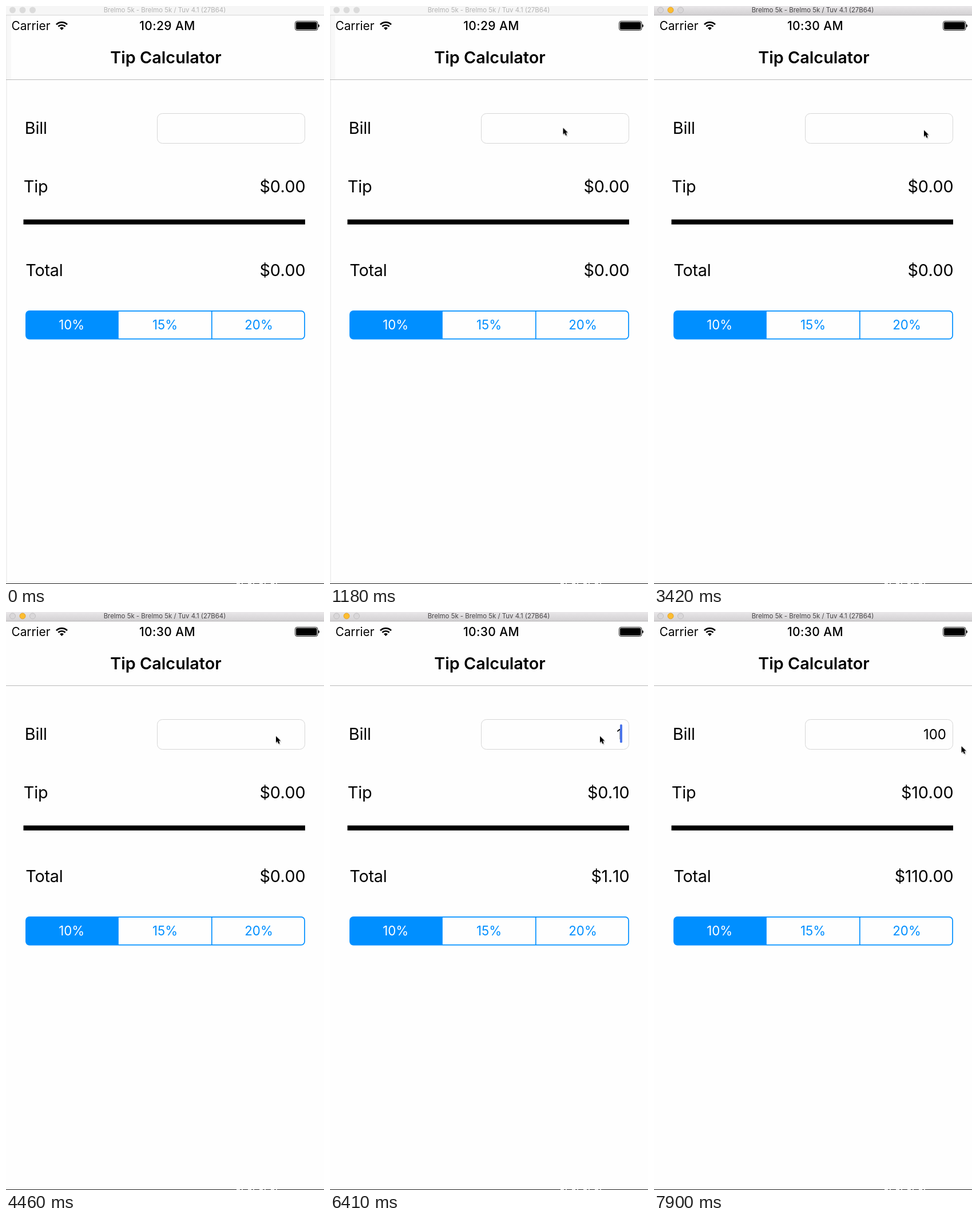
Write an HTML page that moves like this. It is 556x1008 px and loops after 8000 ms.

```html
<!DOCTYPE html>
<html lang="en">
<head>
<meta charset="utf-8">
<title>Tip Calculator</title>
<style>
html, body { margin: 0; width: 100%; height: 100%; overflow: hidden; background: #fefefe; }
svg { display: block; width: 556px; height: 1008px; font-family: Inter, Roboto, sans-serif; }
.label { font-size: 28.8px; letter-spacing: -.2px; }
.sum { font-size: 28.8px; letter-spacing: -.3px; text-anchor: end; font-kerning: none; }
.entry { font-size: 24px; text-anchor: end; font-kerning: none; }
.mid { text-anchor: middle; }
.heading { font-size: 28.8px; font-weight: 600; }
.bar { font-size: 11.4px; }
.status { font-size: 20.8px; }
.clock { font-size: 21px; font-weight: 500; letter-spacing: .4px; }
.tab { font-size: 22.3px; }

/* One loop is 8 s, so 1% is 80 ms; every change is a hard step. */
.step { animation: 8s step-end infinite; }
.idle { animation-name: idle; }
.active { animation-name: active; }
.bill0 { animation-name: bill0; }
.bill1 { animation-name: bill1; }
.bill10 { animation-name: bill10; }
.bill100 { animation-name: bill100; }
.caret { animation-name: caret; }
.pointer { animation-name: pointer; }

@keyframes idle { 0% { visibility: visible } 42.75%, 100% { visibility: hidden } }
@keyframes active { 0% { visibility: hidden } 42.75%, 100% { visibility: visible } }
@keyframes bill0 { 0% { visibility: visible } 80.125%, 100% { visibility: hidden } }
@keyframes bill1 { 0% { visibility: hidden } 80.125% { visibility: visible } 85.75%, 100% { visibility: hidden } }
@keyframes bill10 { 0% { visibility: hidden } 85.75% { visibility: visible } 87.625%, 100% { visibility: hidden } }
@keyframes bill100 { 0% { visibility: hidden } 87.625%, 100% { visibility: visible } }
@keyframes caret {
  0%, 55.75%, 68.875%, 96.875%, 100% { opacity: 0 }
  48.25%, 61.375%, 74.5%, 80.125% { opacity: 1 }
  53.875%, 59.5%, 67%, 72.625%, 78.25%, 95% { opacity: .18 }
}
@keyframes pointer {
  0% { transform: translate(266px, 880px); opacity: 0 }
  3.75% { transform: translate(267px, 880px); opacity: 1 }
  5.625% { transform: translate(300px, 640px) }
  7.5% { transform: translate(335px, 450px) }
  9.25% { transform: translate(365px, 330px) }
  11.125% { transform: translate(388px, 260px) }
  12.875% { transform: translate(400px, 230px) }
  14.75% { transform: translate(407.5px, 212.5px); opacity: 1 }
  16.625% { transform: translate(433px, 230px) }
  18.5% { transform: translate(440px, 500px) }
  20.25% { transform: translate(443px, 719px); opacity: 1 }
  22.125% { transform: translate(443px, 719px); opacity: 0 }
  42.75% { transform: translate(472px, 216.5px); opacity: 1 }
  95% { transform: translate(472px, 216.5px); opacity: 1 }
  96.875% { transform: translate(510px, 228px); opacity: 1 }
  98.75%, 100% { transform: translate(537.5px, 234px); opacity: 1 }
}
</style>
</head>
<body>
<svg viewBox="0 0 556 1008">
  <defs>
    <linearGradient id="chrome" x2="0" y2="1">
      <stop stop-color="#e9e7e9"/>
      <stop offset="1" stop-color="#d2d0d2"/>
    </linearGradient>
  </defs>
  <rect width="556" height="1008" fill="#fefefe"/>

  <!-- window chrome -->
  <g class="step idle">
    <rect y="16" width="9" height="112" fill="#f8f8f8"/>
    <rect y="16" width="2" height="991" fill="#f1f1f1"/>
    <rect width="556" height="16" fill="#f6f6f6"/>
    <rect y="15.5" width="556" height="1" fill="#d6d6d6"/>
    <g fill="#dbdbdb">
      <circle cx="11.5" cy="7" r="5.5"/><circle cx="29" cy="7" r="5.5"/><circle cx="46.5" cy="7" r="5.5"/>
    </g>
    <text class="bar mid" x="277.5" y="11" fill="#b4b4b4">Brelmo 5k - Brelmo 5k / Tuv 4.1 (27B64)</text>
    <text class="clock mid" x="282" y="42.3">10:29 AM</text>
  </g>
  <g class="step active">
    <rect width="556" height="16" fill="url(#chrome)"/>
    <rect y="15.5" width="556" height="1" fill="#b4b2b4"/>
    <g fill="#d9d7d9" stroke="#bfbdbf">
      <circle cx="11.5" cy="7" r="5"/><circle cx="46.5" cy="7" r="5"/>
      <circle cx="29" cy="7" r="5" fill="#fdbd2f" stroke="#e0a02c"/>
    </g>
    <text class="bar mid" x="277.5" y="11" fill="#454345">Brelmo 5k - Brelmo 5k / Tuv 4.1 (27B64)</text>
    <text class="clock mid" x="282" y="42.3">10:30 AM</text>
  </g>

  <!-- status and navigation bars -->
  <text class="status" x="9.5" y="42.3">Carrier</text>
  <g fill="none" stroke="#000" stroke-width="2.7">
    <path d="M88 32.2a13.6 13.6 0 0 1 19 0"/>
    <path d="M91.4 35.8a8.6 8.6 0 0 1 12.2 0"/>
    <path d="M97.5 42l-3.4-3.6a4.8 4.8 0 0 1 6.8 0z" fill="#000" stroke="none"/>
  </g>
  <rect x="505.5" y="26.5" width="39.5" height="16" rx="3.5" fill="none" stroke="#000" stroke-width=".9"/>
  <rect x="507" y="28" width="36.5" height="13" rx="2"/>
  <path d="M546 31.5q2 .8 2 3t-2 3z"/>
  <text class="heading mid" x="279.5" y="100.3">Tip Calculator</text>
  <rect y="128" width="556" height="1" fill="#b9b9b9"/>

  <!-- form -->
  <text class="label" x="32.8" y="223.3">Bill</text>
  <text class="label" x="30.8" y="324.5">Tip</text>
  <text class="label" x="34.3" y="471">Total</text>
  <rect x="264.5" y="187.5" width="258" height="52" rx="9" fill="none" stroke="#d6d6d6"/>
  <rect x="30.5" y="372.3" width="492.5" height="8.7"/>

  <g class="step bill0">
    <text class="sum" x="523.3" y="324.5">$0.00</text>
    <text class="sum" x="523.3" y="471">$0.00</text>
  </g>
  <g class="step bill1">
    <text class="entry" x="511" y="221.7">1</text>
    <text class="sum" x="523.3" y="324.5">$0.10</text>
    <text class="sum" x="523.3" y="471">$1.10</text>
  </g>
  <g class="step bill10">
    <text class="entry" x="511" y="221.7">10</text>
    <text class="sum" x="523.3" y="324.5">$1.00</text>
    <text class="sum" x="523.3" y="471">$11.00</text>
  </g>
  <g class="step bill100">
    <text class="entry" x="511" y="221.7">100</text>
    <text class="sum" x="523.3" y="324.5">$10.00</text>
    <text class="sum" x="523.3" y="471">$110.00</text>
  </g>
  <rect class="step caret" x="507" y="196" width="4" height="32" rx="1.5" fill="#4a74ea"/>

  <!-- tip rate tabs -->
  <g fill="#008fff">
    <path d="M196 532h-155a6 6 0 0 0-6 6v36.5a6 6 0 0 0 6 6h155z"/>
    <path d="M196 532v48.5M359.8 532v48.5" stroke="#008fff" stroke-width="1.7"/>
    <rect x="34.9" y="531.9" width="487.2" height="48.7" rx="6" fill="none" stroke="#008fff" stroke-width="1.7"/>
    <text class="tab mid" x="114.7" y="564.4" fill="#fff">10%</text>
    <text class="tab mid" x="278" y="564.4">15%</text>
    <text class="tab mid" x="442" y="564.4">20%</text>
  </g>

  <rect y="1007" width="556" height="1" fill="#1c1c1c"/>
  <path d="M403 1007.5h72" stroke="#ddd" stroke-dasharray="6 3 2 9"/>

  <g class="step pointer">
    <path d="M1 2v12l2.8-2.4 2.1 4.2 2.2-1-1.9-4.2h3.8z" opacity=".18"/>
    <path d="M0 0v11.4l2.6-2.3 2 4.4 2.1-.9-1.9-4.3h3.6z" stroke="#fff" paint-order="stroke"/>
  </g>
</svg>
</body>
</html>
```
